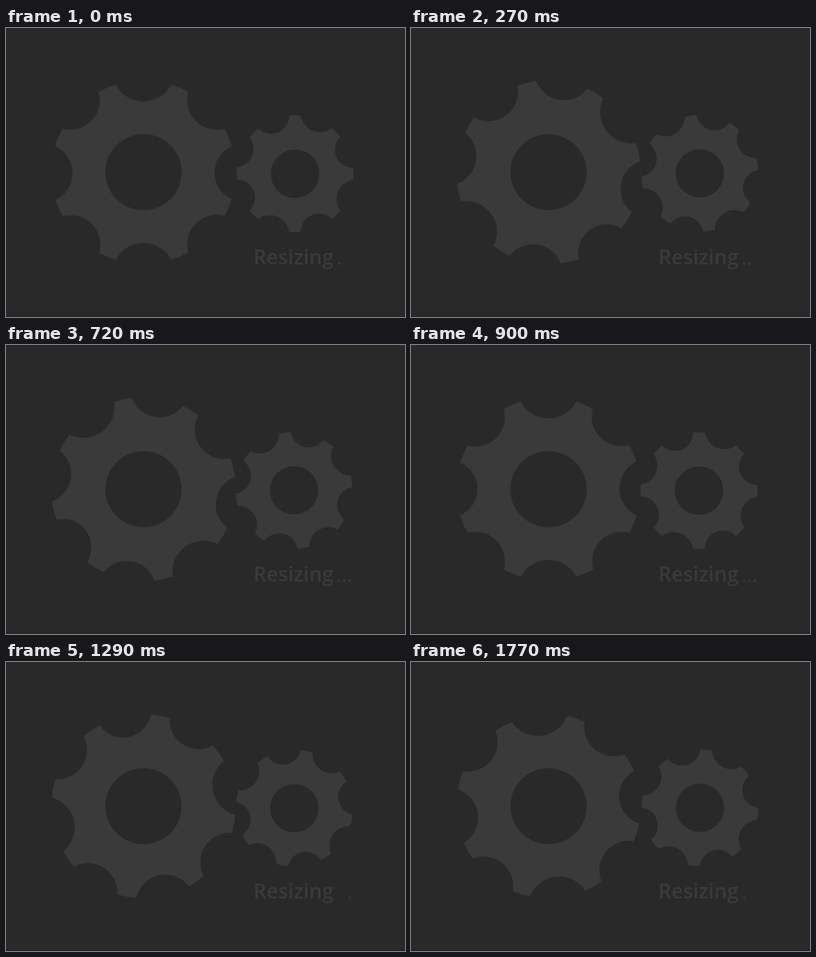
Write an HTML page that moves like this. It is 666x484 px and loops after 1.8 s.

```html
<!DOCTYPE html>
<html lang="en">
<head>
<meta charset="utf-8">
<title>Resizing</title>
<style>
  html, body { margin: 0; width: 100%; height: 100%; overflow: hidden; background: #292929; }
  svg { display: block; width: 666px; height: 484px; fill: #3a3a3a; }
  .gear { transform-origin: 0 0; animation: turn 1.8s steps(60) infinite; }
  .back { animation-direction: normal; animation-name: turn-back; }
  text { font: 600 34px "Open Sans", "Noto Sans", sans-serif; }
  .dot { animation: pulse 1.8s linear infinite; }
  .dot:nth-of-type(1) { animation-delay: -270ms; }
  .dot:nth-of-type(2) { animation-delay: -70ms; }
  .dot:nth-of-type(3) { animation-delay: -1570ms; }
  @keyframes turn { to { transform: rotate(360deg); } }
  @keyframes turn-back { to { transform: rotate(-360deg); } }
  @keyframes pulse {
    0% { opacity: 0; }
    15% { opacity: .85; }
    22%, 48% { opacity: 1; }
    73% { opacity: .3; }
    87% { opacity: .12; }
    100% { opacity: .03; }
  }
</style>
</head>
<body>
<svg viewBox="0 0 666 484">
  <rect y="482" width="666" height="2" fill="#252223"/>
  <g transform="translate(229.5 241.5)"><path id="big" class="gear" fill-rule="evenodd"/></g>
  <g transform="translate(481.5 244)"><path id="small" class="gear back" fill-rule="evenodd"/></g>
  <text x="413" y="396">Resizing</text>
  <g>
    <circle class="dot" cx="556" cy="394.7" r="2.4"/>
    <circle class="dot" cx="564.7" cy="394.7" r="2.4"/>
    <circle class="dot" cx="573.5" cy="394.7" r="2.4"/>
  </g>
</svg>
<script>
  const rad = deg => deg * Math.PI / 180;

  // Each notch is [clockwise angle from the top, distance of its centre, radius].
  function gearPath(radius, hole, notches, ox = 0, oy = 0) {
    const point = a => (ox + radius * Math.sin(a)).toFixed(2) + " " + (oy - radius * Math.cos(a)).toFixed(2);
    let d = "";
    for (const [deg, dist, r] of notches) {
      const half = Math.acos((radius ** 2 + dist ** 2 - r ** 2) / (2 * radius * dist));
      const from = point(rad(deg) - half), to = point(rad(deg) + half);
      d += d ? `A${radius} ${radius} 0 0 1 ${from}` : `M${from}`;
      d += `A${r} ${r} 0 0 0 ${to}`;
    }
    const [deg, dist, r] = notches[0];
    const half = Math.acos((radius ** 2 + dist ** 2 - r ** 2) / (2 * radius * dist));
    d += `A${radius} ${radius} 0 0 1 ${point(rad(deg) - half)}Z`;
    return d + `M${ox - hole} ${oy}a${hole} ${hole} 0 1 0 ${2 * hole} 0a${hole} ${hole} 0 1 0 ${-2 * hole} 0Z`;
  }

  const bigNotches = [
    [0, 170.5, 52], [45.4, 172, 49.5], [90.2, 166.3, 47.8], [134.6, 172, 49.5],
    [180, 170.5, 52], [225, 172, 49.5], [269.5, 168.3, 49.8], [314.6, 172, 49.5]
  ];
  const smallNotches = Array.from({ length: 8 }, (_, i) =>
    [22.5 + 45 * i, ...(i % 2 ? [105.3, 30.5] : [110, 32.2])]);

  big.setAttribute("d", gearPath(154, 63.7, bigNotches));
  small.setAttribute("d", gearPath(97.7, 40.5, smallNotches, 0.9, 0));
</script>
</body>
</html>
```
